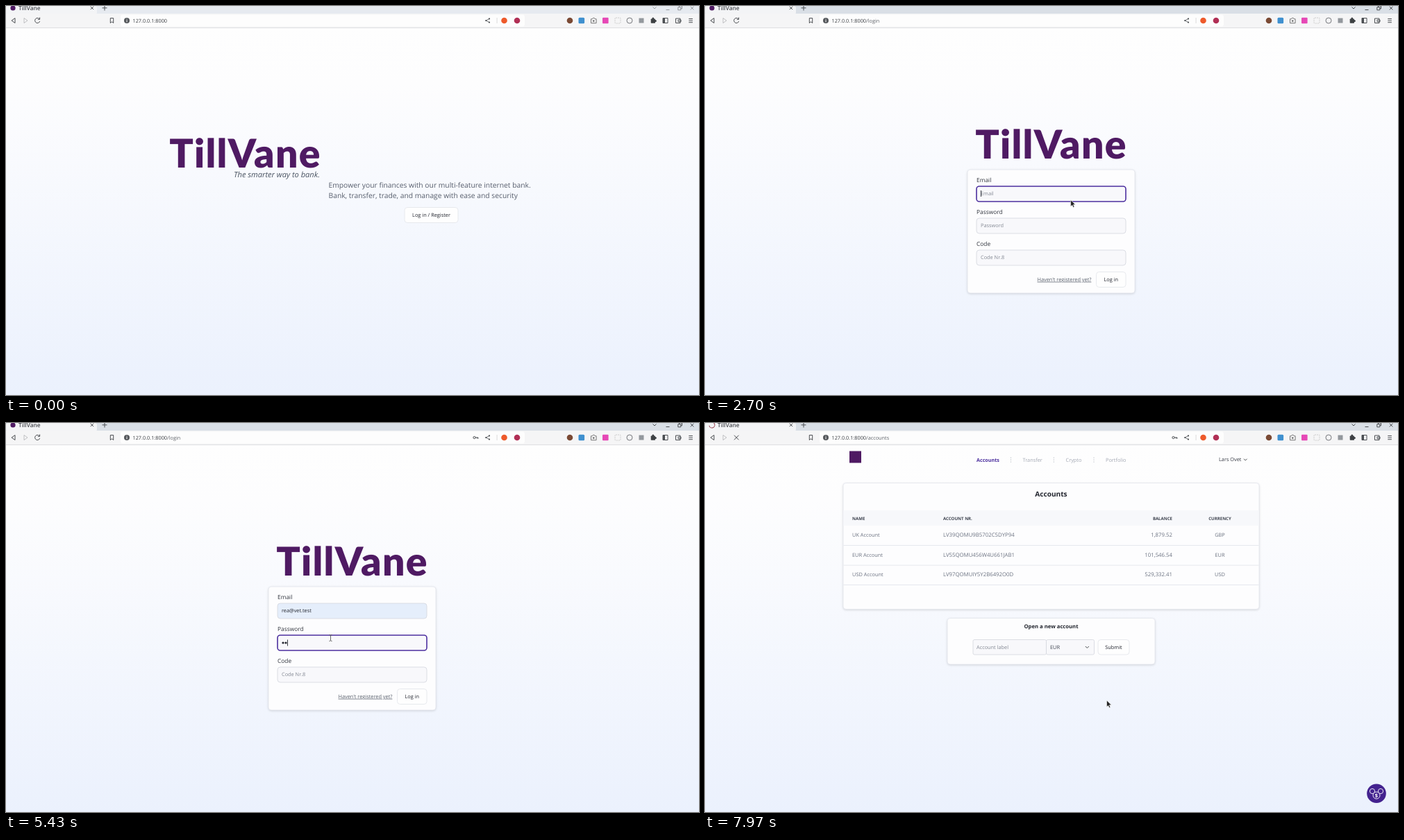
Write an HTML page that moves like this. It is 998x561 px and loops after 8000 ms.

```html
<!DOCTYPE html>
<html lang="en">
<head>
<meta charset="utf-8">
<title>TillVane</title>
<style>
  html, body { margin: 0; width: 100%; height: 100%; overflow: hidden; background: #fff; }
  svg { display: block; width: 998px; height: 561px; }
  text { font-family: "Open Sans", "Noto Sans", sans-serif; text-rendering: geometricPrecision; white-space: pre; }
  .line { fill: none; stroke: #4b4e52; stroke-width: 1; }
  .card { fill: #fdfdfe; stroke: #e3e5ec; stroke-width: .8; filter: drop-shadow(0 1.5px 1.5px #0002); }
  .button { fill: #fefefe; stroke: #e3e5ea; stroke-width: .8; }
  .button.hover { fill: #f0f1f5; }
  .button.hover + text { fill: #4a3a9c; }
  .field { fill: #f8f8fb; stroke: #d3d6de; stroke-width: .8; }
  .field.filled { fill: #e5eefb; }
  .field.focus { stroke: #4c2f9f; stroke-width: 1.6; }
</style>
</head>
<body>
<svg id="stage" viewBox="0 0 998 561"></svg>
<script>
const LOOP = 8000;
const INK = '#23262f', GRAY = '#6b7280', PLUM = '#4f1a63';
const BRAND = 'TillVane', EMAIL = 'rea@vet.test', HOST = '127.0.0.1:8000';

const text = (x, y, size, content, fill = INK, extra = '') =>
  `<text x="${x}" y="${y}" font-size="${size}" fill="${fill}" ${extra}>${content}</text>`;
const rect = (x, y, w, h, fill, r = 0, extra = '') =>
  `<rect x="${x}" y="${y}" width="${w}" height="${h}" rx="${r}" fill="${fill}" ${extra}/>`;
const box = (kind, x, y, w, h, id = '', r = 4) => rect(x, y, w, h, '', r, `class="${kind}" id="${id}"`);
const circle = (x, y, r, fill, extra = '') => `<circle cx="${x}" cy="${y}" r="${r}" fill="${fill}" ${extra}/>`;
const line = (d, extra = '') => `<path class="line" d="${d}" ${extra}/>`;
const group = (id, content) => `<g id="${id}">${content}</g>`;
const middle = 'text-anchor="middle"', end = 'text-anchor="end"';
const bold = 'font-weight="700"', medium = 'font-weight="600"';

const button = (id, x, y, w, h, label) =>
  box('button', x, y, w, h, id) + text(x + w / 2, y + h / 2 + 2.6, 7.35, label, INK, middle);
const wordmark = (x, y) =>
  text(x, y, 57, BRAND, PLUM, 'font-weight="900" letter-spacing="1.3" text-anchor="middle" style="font-family:Lato,sans-serif"');

const chrome = () => [
  rect(0, 0, 998, 11, '', 0, 'id="strip"'),
  rect(0, 0, 131, 12, '#f3f4f6', 3),
  rect(0, 11, 998, 20.5, '#f5f5f6'),
  rect(0, 31, 998, .8, '#d8d9dd'),
  rect(165, 12.5, 582, 17, '#fdfdfd', 3),
  group('favicon', circle(10, 3, 3.6, PLUM)),
  group('spinner', line('M10 -1A4 4 0 1 1 6 3', 'style="stroke:#943a4a"')),
  text(18, 6, 8.3, BRAND, '#45484d', medium),
  line('M121.7 .7l4.4 4.4m0 -4.4l-4.4 4.4M142 -1v7.5m-3.5 -3.7h7'),
  group('controls', line('M931.5 1.5l2.5 2.5l2.5 -2.5M950.5 5.5h5M967.8 1.8h4v4h-4zM969.5 1.8v-2h4v4h-1.7M985.8 .8l4.6 4.6m0 -4.6l-4.6 4.6')),
  line('M13 17.5v7l-5 -3.5z'),
  line('M26 17.5v7l5 -3.5z', 'opacity=".3"'),
  group('reload', line('M48 18.6A3.6 3.6 0 1 0 48.7 22M48.6 16.5v2.8h-2.8')),
  group('stop', line('M42 17.7l6.6 6.6m0 -6.6l-6.6 6.6')),
  line('M150.3 17.5h4.4v7l-2.2 -1.8l-2.2 1.8z'),
  circle(174, 21, 4, '#55585c'),
  rect(173.5, 18.5, 1, 1, '#fff') + rect(173.5, 20.3, 1, 3, '#fff'),
  text(182.5, 23.7, 7.3, `${HOST}<tspan id="path" fill="#60646a"></tspan>`, '#3a3d42'),
  group('key', circle(674.5, 21, 1.6, 'none', 'class="line"') + line('M676 21h4v1.6m-1.5 -1.6v1.4')),
  line('M696 18.4l-4.8 2.6l4.8 2.6', 'style="stroke-width:.8"'),
  ...[[696, 18.4], [691.2, 21], [696, 23.6]].map(([x, y]) => circle(x, y, 1.1, '#4b4e52')),
  rect(706.7, 17, .7, 8, '#ccc'),
  circle(717.5, 21, 4.3, '#ee5a2b'),
  circle(736, 21, 4.3, '#b12f55'),
  circle(812, 21, 4.3, '#7a4934'),
  rect(824.5, 16.7, 8.6, 8.6, '#3f90cf', 1.5),
  line('M842.5 18.7h2l.8 -1.4h2l.8 1.4h2v6h-7.6z', 'style="stroke:#777"') + circle(846.2, 21.6, 1.4, '#777'),
  rect(859, 16.7, 8.6, 8.6, '#e648b6', 1),
  rect(877, 17, 8, 8, 'none', 1, 'stroke="#ccc" stroke-dasharray="2 1"'),
  circle(898, 21, 4, 'none', 'stroke="#77797e"'),
  rect(911.5, 17.5, 7, 7, '#93989d'),
  rect(928.7, 18.5, 6.3, 6.3, '#3d4043', .8) + circle(931.8, 18, 1.5, '#3d4043') + circle(935.3, 21.6, 1.5, '#3d4043'),
  line('M946 17.5h7v7h-7z') + rect(946, 17.5, 3, 7, '#4b4e52'),
  line('M964.5 18h6.5v6.5h-6.5zM968 20h4v2.7h-4z'),
  line('M983.3 18.5h5.6m-5.6 2.6h5.6m-5.6 2.6h5.6'),
].join('');

const homePage = () => group('home', [
  wordmark(344.5, 233),
  text(452, 246.7, 11.1, 'The smarter way to bank.', '#4b5563', `${end} font-style="italic"`),
  text(464.5, 262.3, 10.3, 'Empower your finances with our multi-feature internet bank.', '#565d6b'),
  text(464.5, 277.3, 10.3, 'Bank, transfer, trade, and manage with ease and security', '#565d6b'),
  button('enter', 574, 290.5, 77, 22, 'Log in / Register'),
].join(''));

const formRow = (name, y, placeholder) =>
  text(391, y - 6.2, 8.4, name, '#30343d') +
  box('field', 391, y, 215, 22, name) +
  text(397, y + 13.4, 7.35, placeholder, '#858a95', `id="${name}Hint"`) +
  group(name + 'Dots', '');

const loginPage = () => group('login', [
  wordmark(498.5, 220),
  box('card', 378, 236, 241, 178),
  formRow('Email', 260, 'Email'),
  formRow('Password', 306, 'Password'),
  formRow('Code', 352, 'Code Nr.8'),
  text(397, 273.2, 7.35, EMAIL, INK, 'id="address"'),
  group('squiggle', line('M419 274.8' + 'q.7 -1.4 1.4 0t1.4 0'.repeat(8), 'style="stroke:#d63b3b;stroke-width:.7"')),
  text(478.5, 396.7, 7.35, "Haven't registered yet?", '#59606c', 'text-decoration="underline"'),
  button('submit', 563.5, 383.5, 42.5, 22, 'Log in'),
  rect(0, 0, .9, 9, INK, 0, 'id="caret"'),
  group('popup',
    rect(443.5, 289.5, 72, 21.5, '#fafafa', 1, 'style="filter:drop-shadow(0 1px 1.5px #0005)"') +
    rect(443.5, 290, 72, 18, '#e6e6e8') + text(449.5, 302.3, 8.6, EMAIL, '#50545b')),
].join(''));

const accounts = [
  ['UK Account', 'LV39QOMU9B5702C5DYP94', '1,879.52', 'GBP'],
  ['EUR Account', 'LV55QOMU456W4U661JAB1', '101,546.54', 'EUR'],
  ['USD Account', 'LV97QOMUIY5Y2B6492O0D', '529,332.41', 'USD'],
];
const tableRow = (cells, y, sizes, fill, extra = '') =>
  text(212, y, sizes[0], cells[0], fill, extra) +
  text(343, y, sizes[1], cells[1], fill, extra) +
  text(673, y, sizes[2], cells[2], fill, `${end} ${extra}`) +
  text(741.5, y, sizes[0], cells[3], fill, `${middle} ${extra}`);

const accountsPage = () => group('accounts', [
  rect(208, 40.5, 17, 17, PLUM),
  text(391, 55.5, 7.2, 'Accounts', '#4b2e9e', bold),
  ...[['Transfer', 457.5], ['Crypto', 519.5], ['Portfolio', 577]].map(([name, x]) => text(x, 55.5, 7.35, name, '#a3a8b3')),
  ...[440.5, 502.3, 560].map(x => [50, 53, 56].map(y => circle(x, y, .6, '#9ca3af')).join('')),
  text(740, 55.2, 7.35, 'Lars Ovet', '#373b45', 'font-weight="500"'),
  line('M776 51.7l2.3 2.3l2.3 -2.3'),
  box('card', 199, 86.5, 599, 182),
  text(498.5, 106, 10.1, 'Accounts', INK, `${middle} ${bold}`),
  rect(199.5, 126, 598, 22, '#f7f8fb'),
  tableRow(['NAME', 'ACCOUNT NR.', 'BALANCE', 'CURRENCY'], 139.6, [6.1, 6.1, 6.1], '#3f4450', bold),
  ...accounts.map((cells, i) =>
    tableRow(cells, 164.3 + i * 28.5, [7.4, 7.8, 7.8], GRAY) +
    rect(199.5, 176.2 + i * 28.5, 598, .8, '#e2e4ea')),
  box('card', 349, 281.5, 299, 66.5),
  text(498.5, 295.5, 7.7, 'Open a new account', INK, `${middle} ${bold}`),
  box('field', 386, 312.5, 105.5, 21.5, '', 2),
  text(391, 325.7, 7.35, 'Account label', '#858a95'),
  box('field', 491.5, 312.5, 69, 21.5, '', 2),
  text(497, 325.7, 7.35, 'EUR', '#3f4450'),
  line('M547.8 322l2.5 2.5l2.5 -2.5'),
  button('', 566, 312.5, 45, 21.5, 'Submit'),
  circle(967, 534.3, 13.8, '#43228f'),
  ...[[961, 531], [973, 531], [967, 537]].map(([x, y]) => circle(x, y, y > 533 ? 5 : 3.6, '#43228f', 'stroke="#ece8f7"')),
  text(967, 539.8, 7.5, '$', '#fff', `${middle} ${bold}`),
].join(''));

const pointer = () => group('pointer',
  group('arrow', '<path d="M0 0v9.5l2.2 -2l1.5 3.2l1.6 -.8l-1.5 -3.1h3z" fill="#222" stroke="#fff" stroke-width=".6"/>') +
  group('hand', '<path d="M-.8 .6q.8 -1.2 1.6 0v3.4l4 1q1 .4 .8 1.6l-.7 3.4h-5.2l-2.4 -3.6q.2 -1.2 1.9 .2z" fill="#222" stroke="#fff" stroke-width=".5"/>') +
  group('beam', line('M-2 -4.5q2 0 2 1v7q0 1 -2 1M2 -4.5q-2 0 -2 1M2 4.5q-2 0 -2 -1', 'style="stroke-width:.9;stroke:#555"')));

document.getElementById('stage').innerHTML =
  `<defs><linearGradient id="sky" x2="0" y2="1">
     <stop stop-color="#fefefe"/><stop offset=".15" stop-color="#fdfdfe"/><stop offset="1" stop-color="#ebf1fd"/>
   </linearGradient></defs>` +
  rect(0, 31, 998, 530, 'url(#sky)') + homePage() + loginPage() + accountsPage() + chrome() +
  group('status', rect(-3, 548, 82.5, 16, '#d4d7db', 2, 'stroke="#c2c5ca" stroke-width=".7"') +
    text(2, 557.6, 7.75, HOST + '/login', '#3a3d42')) + pointer();

const el = id => document.getElementById(id);
const show = (id, on) => { el(id).style.display = on ? '' : 'none'; };
const within = (t, from, to) => t >= from && t < to;

// Pointer stops: time, x, y
const route = [
  [600, 760, 36], [900, 700, 110], [1650, 590, 288], [1850, 584, 295], [2500, 584, 295],
  [2850, 490, 270], [3050, 488, 272], [3250, 488, 291], [3500, 487, 292], [4200, 480, 293],
  [4500, 480, 293], [4850, 467.5, 310], [6400, 467.5, 310], [6900, 579, 399], [7600, 579, 399], [7750, 578.5, 400],
];
function pointerAt(t) {
  const next = route.findIndex(stop => stop[0] > t);
  if (next < 0) return route[route.length - 1].slice(1);
  const a = route[Math.max(0, next - 1)], b = route[next];
  const k = Math.max(0, (t - a[0]) / (b[0] - a[0] || 1));
  const ease = k * k * (3 - 2 * k);
  return [a[1] + (b[1] - a[1]) * ease, a[2] + (b[2] - a[2]) * ease];
}

// Moments after which the caret starts a fresh blink
const edits = [0, 2400, 4200, 4880, 5300, 5420, 5540, 5660, 5780, 5900, 6020, 6140, 6500, 6780];
const caretLit = t => (t - edits.filter(edit => edit <= t).pop()) % 1000 < 500;

function setDots(name, y, count) {
  el(name + 'Dots').innerHTML = Array.from({ length: count }, (_, i) => circle(399 + i * 4, y, 1.6, INK)).join('');
  show(name + 'Hint', !count);
}

function draw(t) {
  const onHome = t < 2400, onAccounts = t >= 7800;
  show('home', onHome);
  show('login', !onHome && !onAccounts);
  show('accounts', onAccounts);

  const windowActive = t >= 1950;
  el('strip').setAttribute('fill', windowActive ? '#d9dfe6' : '#e6eaf0');
  el('controls').setAttribute('opacity', windowActive ? 1 : .5);

  const loading = within(t, 2000, 2560) || t >= 7560;
  show('reload', !loading);
  show('stop', loading);
  show('favicon', !loading);
  show('spinner', loading);
  el('spinner').setAttribute('transform', `rotate(${t * .36} 10 3)`);
  el('path').textContent = onAccounts ? '/accounts' : t >= 2050 ? '/login' : '';
  show('status', within(t, 1720, 2400));
  show('key', t >= 5300);

  const focus = t < 4880 ? 'Email' : t < 6500 ? 'Password' : 'Code';
  for (const name of ['Email', 'Password', 'Code']) el(name).classList.toggle('focus', name === focus);
  const filled = t >= 3250;
  el('Email').classList.toggle('filled', filled);
  show('EmailHint', !filled);
  show('address', filled);
  show('squiggle', within(t, 4200, 4880));
  show('popup', within(t, 2950, 4500));

  const typed = Math.max(0, Math.min(8, Math.floor((t - 5180) / 120)));
  const digits = t >= 6780 ? 1 : 0;
  setDots('Password', 317, typed);
  setDots('Code', 363, digits);

  const caretSpots = {
    Email: [t >= 4200 ? 440.3 : 397, 266],
    Password: [397 + typed * 4, 312.5],
    Code: [397 + digits * 4, 358.5],
  };
  const [caretX, caretY] = caretSpots[focus];
  el('caret').setAttribute('transform', `translate(${caretX} ${caretY})`);
  show('caret', !within(t, 3250, 4200) && caretLit(t));

  const [x, y] = pointerAt(t);
  const overEnter = within(t, 1720, 2000), overSubmit = within(t, 6860, 7560);
  el('enter').classList.toggle('hover', overEnter);
  el('submit').classList.toggle('hover', overSubmit);
  const hand = overEnter || overSubmit;
  const beam = within(t, 2800, 3120) || within(t, 4800, 6450);
  show('pointer', t >= 600);
  el('pointer').setAttribute('transform', `translate(${x} ${y})`);
  show('hand', hand);
  show('beam', beam);
  show('arrow', !hand && !beam);
}

const start = performance.now();
function tick() {
  draw((performance.now() - start) % LOOP);
  requestAnimationFrame(tick);
}
tick();
</script>
</body>
</html>
```
